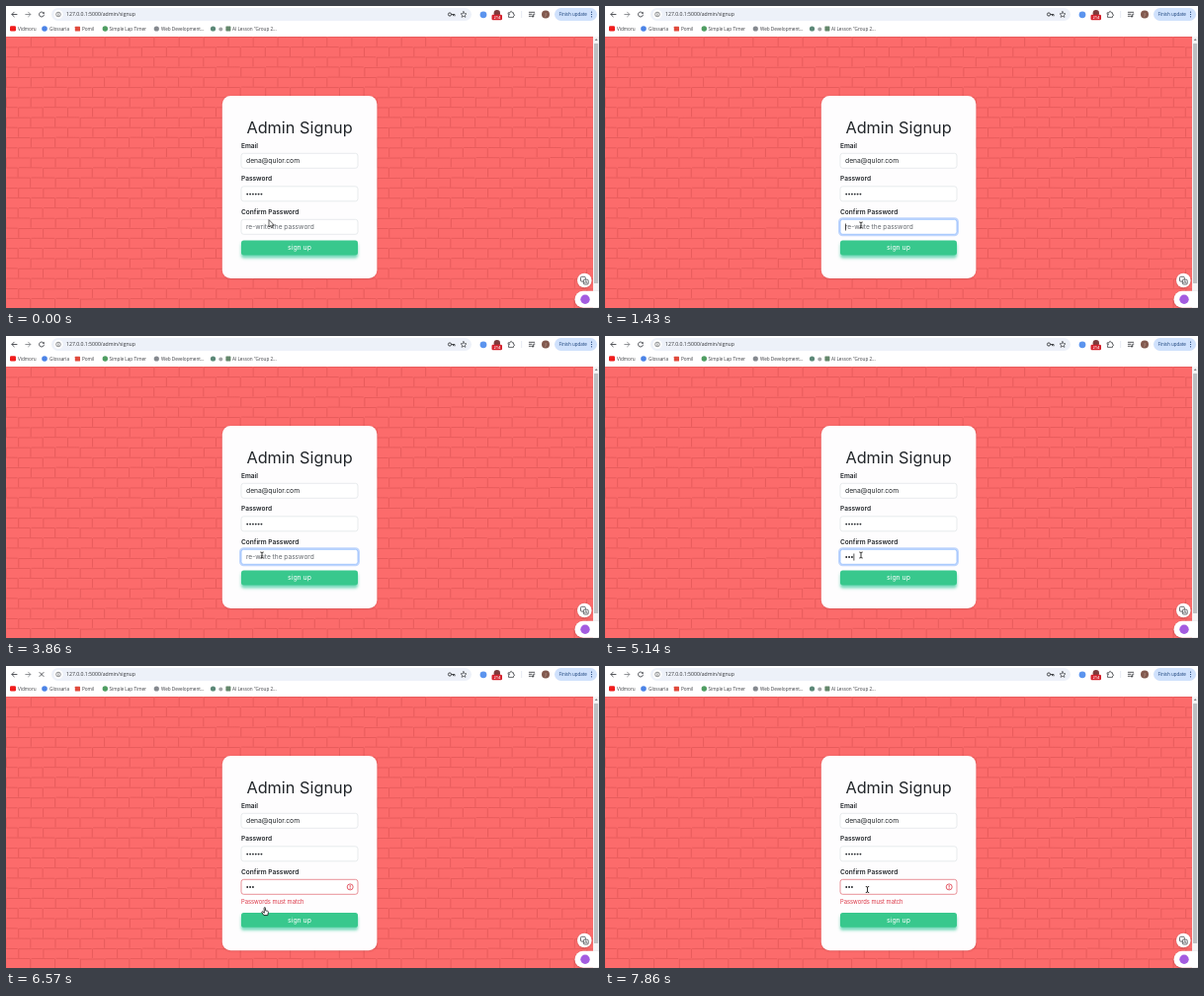
An HTML page with a canvas for the animation above (8 s loop, 600 px wide and 306 px high).

```html
<!DOCTYPE html>
<html lang="en">
<head>
<meta charset="utf-8">
<title>Admin Signup</title>
<style>
  html, body { margin: 0; width: 100%; height: 100%; overflow: hidden; background: #fff; }
  canvas { display: block; width: 600px; height: 306px; }
</style>
</head>
<body>
<canvas id="stage"></canvas>
<script>
const W = 600, H = 306, LOOP = 8000, STEP = 1000 / 7;
const PAGE = 'Inter, "Open Sans", sans-serif';
const CHROME = '"Open Sans", "Noto Sans", sans-serif';
const INK = '#212529', RED = '#dc3545';

const canvas = document.getElementById('stage');
const ctx = canvas.getContext('2d');
const dpr = window.devicePixelRatio || 1;
canvas.width = W * dpr;
canvas.height = H * dpr;

// Moments of the story, in ms
const FOCUS = 920, KEYS = [4565, 4850, 5135], HOVER = 6000, LOAD = 6420, FAIL = 6560, LOADED = 6705;

// Pointer path: [time, x, y]
const PATH = [
  [0, 266, 217], [140, 266, 217], [720, 259, 222], [5700, 259, 222],
  [6150, 261, 245], [6720, 261, 245], [7430, 265.5, 226.5], [LOOP, 265.5, 226.5]
];

function pointer(t) {
  const i = Math.max(1, PATH.findIndex(p => p[0] > t));
  const [t0, x0, y0] = PATH[i - 1], [t1, x1, y1] = PATH[i];
  const u = (t - t0) / (t1 - t0), k = u * u * (3 - 2 * u);
  return [x0 + (x1 - x0) * k, y0 + (y1 - y0) * k];
}

function moveTo(x, y) {
  ctx.setTransform(dpr, 0, 0, dpr, x * dpr, y * dpr);
}

function text(str, x, y, size, color = INK, weight = 400, family = PAGE, align = 'left') {
  ctx.font = `${weight} ${size}px ${family}`;
  ctx.fillStyle = color;
  ctx.textAlign = align;
  ctx.fillText(str, x, y);
}

function box(x, y, w, h, r, fill, stroke, line = 0.6) {
  ctx.beginPath();
  ctx.roundRect(x, y, w, h, r);
  if (fill) { ctx.fillStyle = fill; ctx.fill(); }
  if (stroke) { ctx.strokeStyle = stroke; ctx.lineWidth = line; ctx.stroke(); }
}

function disc(x, y, r, fill, stroke, line = 0.8) {
  ctx.beginPath();
  ctx.arc(x, y, r, 0, Math.PI * 2);
  if (fill) { ctx.fillStyle = fill; ctx.fill(); }
  if (stroke) { ctx.strokeStyle = stroke; ctx.lineWidth = line; ctx.stroke(); }
}

function draw(d, x, y, fill, stroke, line = 0.9) {
  const p = new Path2D(d);
  ctx.save();
  moveTo(x, y);
  ctx.lineCap = ctx.lineJoin = 'round';
  if (fill) { ctx.fillStyle = fill; ctx.fill(p); }
  if (stroke) { ctx.strokeStyle = stroke; ctx.lineWidth = line; ctx.stroke(p); }
  ctx.restore();
}

function shadow(color, y, blur, paint) {
  ctx.save();
  ctx.shadowColor = color;
  ctx.shadowOffsetY = y * dpr;
  ctx.shadowBlur = blur * dpr;
  paint();
  ctx.restore();
}

function makeWall() {
  const wall = new Path2D();
  let seed = 7;
  const rand = () => (seed = seed * 16807 % 2147483647) / 2147483647;
  const rowH = 10.2, brickW = 25;
  for (let row = 0, y = 31.5; y < H; row++, y += rowH) {
    for (let x = row % 2 ? -12.5 : 0; x < 594; x += brickW) {
      const j = rand() * 0.8 - 0.4;
      wall.moveTo(x + 0.6, y + j);
      wall.lineTo(x + brickW - 0.8, y + j / 2);
      wall.moveTo(x + j, y);
      wall.lineTo(x + j, y + rowH - 0.8);
    }
  }
  return wall;
}
const wall = makeWall();

function drawWall() {
  ctx.save();
  ctx.beginPath();
  ctx.rect(0, 31, 594, H - 31);
  ctx.clip();
  ctx.fillStyle = '#fc6b6b';
  ctx.fillRect(0, 31, 594, H - 31);
  ctx.strokeStyle = '#e25859';
  ctx.lineWidth = 0.8;
  ctx.stroke(wall);
  ctx.restore();
}

function drawToolbar(loading) {
  const icon = '#44474b';
  ctx.fillStyle = '#fff';
  ctx.fillRect(0, 0, W, 31);
  draw('M2.5 0H-2.5M-.3-2.3L-2.6 0L-.3 2.3', 8.5, 8.5, null, icon);
  draw('M-2.5 0H2.5M.3-2.3L2.6 0L.3 2.3', 22.3, 8.5, null, '#85888c');
  if (loading) draw('M-2-2L2 2M2-2L-2 2', 36, 8.5, null, icon);
  else {
    draw('M2.2-1.3A2.5 2.5 0 1 0 2.5.6', 36, 8.5, null, icon);
    draw('M2.7-2.8V-.7H.6Z', 36, 8.5, icon);
  }

  box(46, 2, 425, 13, 6.5, '#edf1f9');
  disc(53, 8.5, 4.6, '#fff');
  disc(53, 8.5, 2.3, null, icon, 0.6);
  draw('M0-.2V1.2M0-1.3V-1.2', 53, 8.5, null, icon, 0.6);
  text('127.0.0.1:5000/admin/signup', 61, 10.4, 5.15, '#303236', 400, CHROME);
  disc(449, 8.5, 1.6, null, icon, 1);
  draw('M1.7 0H5V1.4M3.6 0V1.2', 449, 8.5, null, icon, 1);
  draw('M0-3L.9-.9L3-.8L1.4.6L1.9 2.8L0 1.6L-1.9 2.8L-1.4.6L-3-.8L-.9-.9Z', 463, 8.6, null, icon, 0.7);

  disc(483, 8.8, 3.4, '#5b94ee');
  disc(496.8, 7.2, 3.2, '#7c3b3b');
  box(491.5, 8.8, 10.5, 5.4, 1.2, '#d5202b');
  text('214', 496.8, 13, 4, '#fff', 600, CHROME, 'center');
  draw('M-2.5-1.6H-.8C-1.2-3.6 1.4-3.6 1-1.6H2.5V0C3.9-.3 3.9 2 2.5 1.7V3H-2.5V1.5C-1-1.5-1 0-2.5 0Z', 511, 8.4, null, icon, 0.8);
  box(521.5, 5, 0.6, 7, 0, '#d5dcea');
  draw('M-2.7-2.2H2.7M-2.7-.2H0M-2.7 1.8H-.6', 532, 8.5, null, icon, 0.9);
  draw('M1.8 2V-.4H2.9', 532, 8.5, null, icon, 0.9);
  disc(533, 10.5, 1, icon);
  disc(546, 8.4, 4, '#81594e');
  text('J', 546, 10, 4.2, '#e8d8d0', 400, CHROME, 'center');

  box(555, 2, 43, 13, 6.5, '#cfe1fc');
  text('Finish update', 559.5, 10.1, 4.5, '#153d77', 400, CHROME);
  for (const y of [6.2, 8.5, 10.8]) disc(592.5, y, 0.6, '#153d77');
}

function drawBookmarks() {
  const mark = (str, x) => text(str, x, 24.7, 4.65, '#3a3c40', 400, CHROME);
  box(4, 20.3, 6, 5.2, 1.2, '#f01c1c');
  mark('Vidmoru', 12);
  disc(39, 23, 2.8, '#4b83e6');
  mark('Glossaria', 44);
  box(69.8, 20.7, 5.2, 4.8, 0.6, '#df4a3c');
  mark('Pomil', 77);
  disc(100.3, 23, 2.7, '#4f9d62');
  mark('Simple Lap Timer', 104.5);
  disc(152.3, 23, 2.6, '#85898f');
  mark('Web Development...', 157);
  disc(209.5, 23, 2.6, '#5b8877');
  disc(217.3, 23.4, 2, '#a3a7a8');
  box(222.4, 20.4, 5, 5, 0.6, '#64876b');
  mark('AI Lesson "Group 2...', 229);
}

function drawEdge() {
  ctx.fillStyle = '#f4f4f5';
  ctx.fillRect(594, 31, 6, H - 31);
  draw('M-1.5 1L0-.9L1.5 1Z', 597.2, 34, '#808286');
  box(595, 38, 4.2, 243, 0.5, '#bdbfc2');

  const float = 'rgba(60,20,20,.3)';
  shadow(float, 0.6, 2, () => disc(585.3, 278, 7.3, '#fff'));
  box(581.5, 274.3, 4.8, 4.8, 1, null, '#46494e', 0.8);
  box(584.4, 277.2, 4.8, 4.8, 1, '#fff', '#46494e', 0.8);
  draw('M-1.2 1.2L0-1.3L1.2 1.2M-.8.4H.8', 586.8, 279.6, null, '#46494e', 0.5);
  shadow(float, 0.6, 2, () => box(575.5, 288.8, 30, 17, 8.5, '#fff'));
  disc(586, 297.3, 4.7, '#a45ce0');
}

function input(y, state) {
  if (state === 'focus') box(237, y - 1, 120, 17, 3.5, null, 'rgba(90,150,250,.38)', 2);
  const edge = { focus: '#86b7fe', error: '#e0636e' }[state] || '#dee2e6';
  box(238, y, 118, 15, 2.5, '#fff', edge, 0.7);
}

function dots(n, y) {
  for (let i = 0; i < n; i++) disc(244.2 + i * 2.85, y, 0.95, INK);
}

function drawCard(t) {
  const failed = t >= FAIL;
  const typed = KEYS.filter(k => t >= k).length;
  const focused = t >= FOCUS && !failed;
  shadow('rgba(120,30,30,.25)', 0.5, 2, () => box(218.8, 91, 156.6, failed ? 197.3 : 185, 8.5, '#fefdfe'));

  text('Admin Signup', 297, 129, 16.3, INK, 400, PAGE, 'center');
  text('Email', 238, 144, 6.55, INK, 600);
  input(149.3);
  text('dena@qulor.com', 243, 159, 6.75);
  text('Password', 238, 177.4, 6.55, INK, 600);
  input(182.8);
  dots(6, 190.6);
  text('Confirm Password', 238, 211, 6.55, INK, 600);
  input(216.3, failed ? 'error' : focused ? 'focus' : '');
  if (typed) dots(typed, 224);
  else text('re-write the password', 243, 226.2, 6.6, '#62676d');

  const since = typed ? KEYS[typed - 1] : FOCUS;
  if (focused && Math.floor((t - since) / 530) % 2 === 0) {
    box(243 + typed * 2.85, 220.4, 0.7, 7.2, 0, '#111');
  }

  if (failed) {
    disc(348.2, 223.9, 3, null, RED, 0.8);
    draw('M0-1.6V.3M0 1.5V1.6', 348.2, 223.9, null, RED, 0.8);
    text('Passwords must match', 238, 241.2, 5.8, RED);
  }

  const by = failed ? 250 : 237.6;
  const hover = t >= HOVER && !failed;
  shadow('rgba(46,200,150,.65)', 3, 3, () => box(238, by, 118, 14.8, 2.6, hover ? '#058205' : '#38c88d'));
  text('sign up', 297, by + 9.6, 6.9, '#fff', 400, PAGE, 'center');
}

function drawPointer(t) {
  const [x, y] = pointer(t);
  if (t >= HOVER && t < 6850) {
    draw('M-.7-3.4C-.7-4.5.7-4.5.7-3.4V-.9L2.9-.4C3.5-.2 3.7.2 3.6.8L3 3.9H-.9L-3 .9C-3.3.2-2.4-.2-1.9.2L-.7 1.3Z',
      x + 0.8, y + 3.7, '#fff', '#111', 0.8);
  } else if (t < 420) {
    draw('M0 0V7L1.6 5.5L2.7 8L3.8 7.5L2.8 5.1H5Z', x, y, '#fff', '#222', 0.7);
  } else {
    draw('M-1.3-3Q0-3 0-2.2Q0-3 1.3-3M0-2.2V2.2M-1.3 3Q0 3 0 2.2Q0 3 1.3 3', x, y, null, '#111', 0.85);
  }
}

function frame(now) {
  const t = Math.floor((now % LOOP + 4) / STEP) * STEP % LOOP;
  moveTo(0, 0);
  drawWall();
  drawToolbar(t >= LOAD && t < LOADED);
  drawBookmarks();
  drawCard(t);
  drawEdge();
  drawPointer(t);
}

const start = performance.now();
function tick() {
  frame(performance.now() - start);
  requestAnimationFrame(tick);
}
tick();
</script>
</body>
</html>
```
